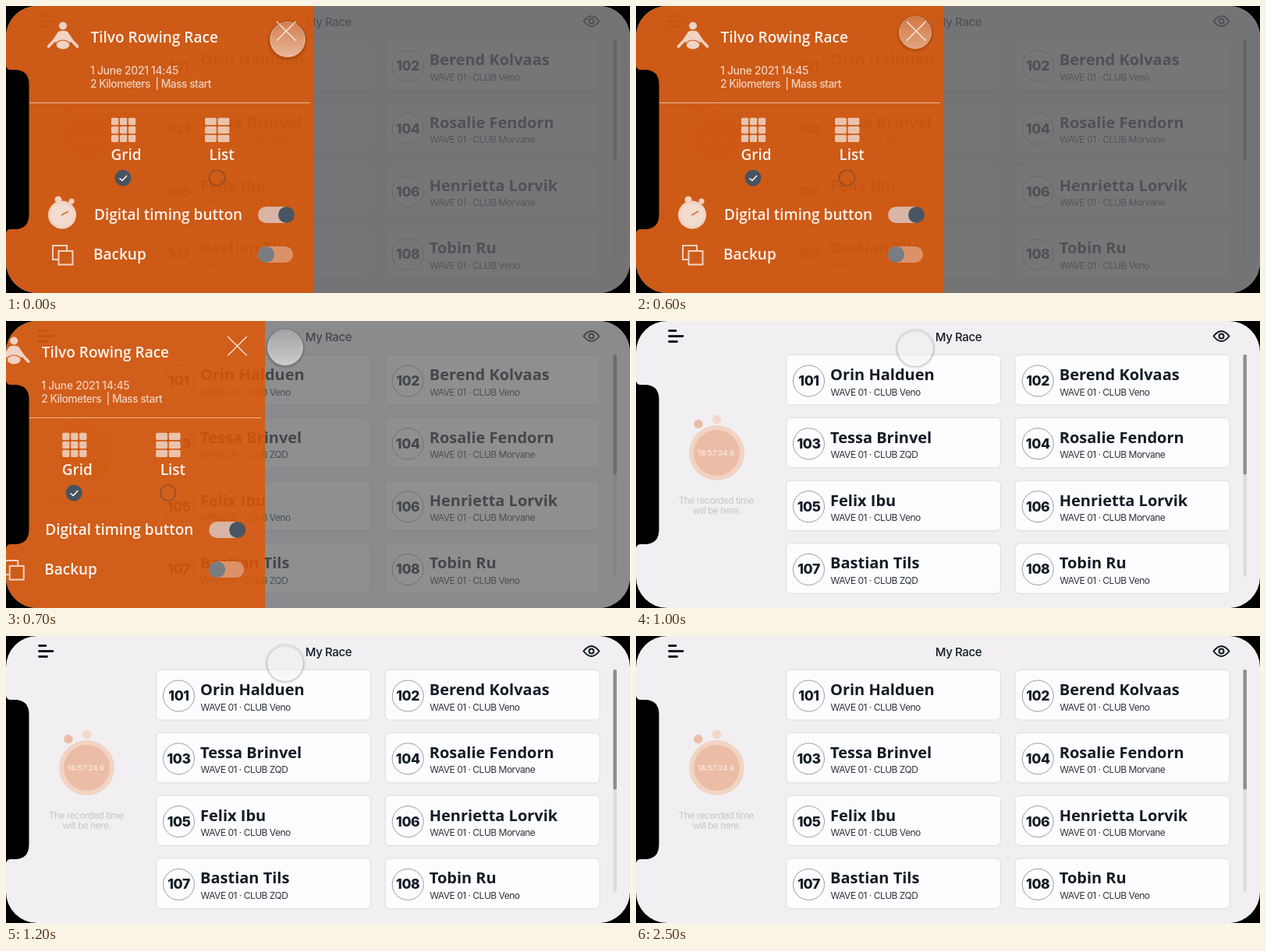
Recreate the animation shown at these times as an HTML page. Size 800 px wide and 369 px high, loop 2700 ms.

```html
<!DOCTYPE html>
<html lang="en">
<head>
<meta charset="utf-8">
<title>My Race</title>
<style>
  html, body { margin: 0; width: 100%; height: 100%; overflow: hidden; background: #000; }
  svg { display: block; width: 100vw; height: 100vh; }
  text { font-family: Inter, "Liberation Sans", sans-serif; white-space: pre; }
  .name { font: 700 20px "Open Sans", "Noto Sans", sans-serif; fill: #111c24; }
  .club { font-size: 12px; letter-spacing: -.5px; fill: #2c343a; }
  .num { font-weight: 800; font-size: 17.5px; letter-spacing: -.4px; fill: #111c24; }
  .label { font: 600 19px "Open Sans", "Noto Sans", sans-serif; fill: #fbf3ee; }
  .info { font-weight: 500; font-size: 13.8px; fill: #f1d0be; }
  .hint { font-size: 12px; letter-spacing: -.5px; fill: #c8c5c8; }
  .mid { text-anchor: middle; }
</style>
</head>
<body>
<svg viewBox="0 0 800 369">
  <defs>
    <clipPath id="screen"><rect width="800" height="369" rx="40"/></clipPath>
    <linearGradient id="glass" x2="0" y2="1">
      <stop stop-color="#eee" stop-opacity=".26"/>
      <stop offset="1" stop-color="#f4f4f4" stop-opacity=".6"/>
    </linearGradient>
    <radialGradient id="shade">
      <stop offset=".82" stop-opacity="0"/>
      <stop offset=".86" stop-opacity=".18"/>
      <stop offset="1" stop-opacity="0"/>
    </radialGradient>
  </defs>
  <g clip-path="url(#screen)">
    <rect width="800" height="369" fill="#f1eff2"/>
    <g stroke="#111c24" stroke-width="2.8" stroke-linecap="round" fill="none">
      <path d="M42.5 12.5H51M42.5 19.5H60M42.5 26.5H52.5"/>
      <path d="M740.5 19.5Q750.5 6.5 760.5 19.5Q750.5 32.5 740.5 19.5Z" stroke-width="2"/>
      <circle cx="750.5" cy="19.5" r="3" stroke-width="2"/>
    </g>
    <text class="mid" x="413.5" y="25.5" font-size="15" font-weight="500" letter-spacing="-.35" fill="#111c24">My Race</text>
    <g fill="#ecbda6">
      <circle cx="80" cy="132.5" r="5.8"/>
      <circle cx="103.5" cy="126.5" r="5.8" fill="#f2d8ca"/>
      <circle cx="103.5" cy="169.5" r="35.5" fill="#f1d4c4"/>
      <circle cx="103.5" cy="169.5" r="29.5"/>
    </g>
    <text class="mid" x="102.5" y="173" font-size="9.5" font-weight="500" fill="#f9ebe4">18:57:24.9</text>
    <text class="hint mid" x="102.5" y="234.5">The recorded time</text>
    <text class="hint mid" x="103.5" y="248">will be here.</text>
    <g id="cards"></g>
    <rect x="778.5" y="43" width="4.5" height="286" rx="2.2" fill="#dddbde"/>
    <rect x="778.5" y="43" width="4.5" height="154.5" rx="2.2" fill="#8f8e92"/>
    <rect id="dim" width="800" height="369" fill="#5c5c5e"/>

    <g id="panel">
      <rect x="-10" width="405" height="369" fill="#e05603" fill-opacity=".83"/>
      <g fill="#f0d3c4">
        <circle cx="73" cy="25.5" r="5"/>
        <path d="M67 33Q73 30.500 79 33L87 45L73 50L59 45Z"/>
        <path d="M63 43L54.5 52M83 43L91.5 52" stroke="#f0d3c4" stroke-width="3.6" stroke-linecap="round"/>
        <ellipse cx="73" cy="50" rx="9" ry="6" stroke="#cd5c18" stroke-width="1.2"/>
      </g>
      <text class="label" x="108.5" y="46.5">Tilvo Rowing Race</text>
      <path d="M347 20L371.5 44.5M371.5 20L347 44.5" stroke="#fbe9df" stroke-width="1.4"/>
      <text class="info" x="108" y="87.5" letter-spacing="-.25">1 June 2021 14:45</text>
      <text class="info" x="108" y="105" letter-spacing="-.5">2 Kilometers  | Mass start</text>
      <path d="M30 124.5H390" stroke="#e9b799"/>
      <g id="tiles" fill="#ebc3ad"></g>
      <text class="label" x="134.5" y="198">Grid</text>
      <text class="label" x="260.5" y="198">List</text>
      <circle cx="150" cy="221" r="10.5" fill="#485360"/>
      <path d="M145.5 221.5L149 224.5L155 218" fill="none" stroke="#fff" stroke-width="1.5"/>
      <circle cx="270.5" cy="221" r="10" fill="none" stroke="#7d4a32" stroke-width="1.2"/>
      <g fill="#f3d2c0">
        <circle cx="67" cy="249" r="4.5"/>
        <circle cx="84" cy="251" r="3.5"/>
        <circle cx="72" cy="268.5" r="18"/>
        <circle cx="72" cy="268.5" r="14.5" fill="#f1dccf"/>
        <path d="M71 269L80 264" stroke="#d0713a" stroke-width="1.6"/>
      </g>
      <text class="label" x="113" y="275">Digital timing button</text>
      <rect x="323" y="258" width="46" height="21" rx="10.5" fill="#d9b5a5"/>
      <circle cx="359.5" cy="268.5" r="10.5" fill="#4a5563"/>
      <g fill="#cd5c18" stroke="#f0d3c4" stroke-width="2">
        <rect x="60" y="308" width="18" height="18"/>
        <rect x="67.5" y="315" width="18" height="17.5"/>
      </g>
      <text class="label" x="112" y="326">Backup</text>
      <rect x="323" y="309" width="45" height="21" rx="10.5" fill="#dc9168"/>
      <circle cx="333.5" cy="319.5" r="10.5" fill="#777d83"/>
    </g>

    <g id="finger">
      <circle cy="1.5" r="26.5" fill="url(#shade)"/>
      <circle r="22.3" fill="url(#glass)" stroke="#fff" stroke-opacity=".5"/>
    </g>
  </g>
  <path d="M0 77Q1 82 6 82H11Q29.500 82 29.500 101V268Q29.500 287 11 287H6Q1 287 0 292Z"/>
</svg>
<script>
const $ = id => document.getElementById(id);

const rowers = [
  ["Orin Halduen", "Veno"], ["Berend Kolvaas", "Veno"],
  ["Tessa Brinvel", "ZQD"], ["Rosalie Fendorn", "Morvane"],
  ["Felix Ibu", "Veno"], ["Henrietta Lorvik", "Morvane"],
  ["Bastian Tils", "ZQD"], ["Tobin Ru", "Veno"]
];
$("cards").innerHTML = rowers.map(([name, club], i) => `
  <g transform="translate(${192.5 + i % 2 * 293.7} ${43.5 + (i >> 1) * 80.8})">
    <rect width="275" height="64.5" rx="6" fill="#fdfcfe" stroke="#dddbe0"/>
    <circle cx="29" cy="33.5" r="20" fill="none" stroke="#9b9ca2"/>
    <text class="num mid" x="29" y="39.5">${101 + i}</text>
    <text class="name" x="56.5" y="32.5">${name}</text>
    <text class="club" x="57" y="52">WAVE 01 · CLUB ${club}</text>
  </g>`).join("");

const tiles = (x, columns, width) => Array.from({ length: columns * 3 }, (_, i) =>
  `<rect x="${x + i % columns * (width + 1.8)}" y="${143.7 + Math.floor(i / columns) * 11}"
    width="${width}" height="9.2" rx="1.6"/>`).join("");
$("tiles").innerHTML = tiles(135, 3, 9.2) + tiles(255, 2, 14.8);

const clamp = p => Math.min(1, Math.max(0, p));
const easeInOut = (p, power) => p < .5
  ? (2 * p) ** power / 2
  : 1 - (2 - 2 * p) ** power / 2;

const LOOP = 2700, STEP = 100;

function draw(now) {
  const t = Math.floor(now % LOOP / STEP) * STEP;
  const slide = easeInOut(clamp((t - 600) / 270), 4);
  const fade = easeInOut(clamp((t - 600) / 280), 3);
  $("panel").setAttribute("transform", `translate(${-417 * slide} 0)`);
  $("dim").setAttribute("opacity", .83 * (1 - fade));

  const away = (1 - clamp(t / 300)) ** 2;
  const pressed = t === 600;
  $("finger").setAttribute("transform",
    `translate(${358 + 3 * away} ${34 + 9 * away}) scale(${pressed ? .92 : 1})`);
  $("finger").setAttribute("opacity", t >= 2400 ? 0 : pressed ? .8 : 1);
  requestAnimationFrame(draw);
}
requestAnimationFrame(draw);
</script>
</body>
</html>
```
